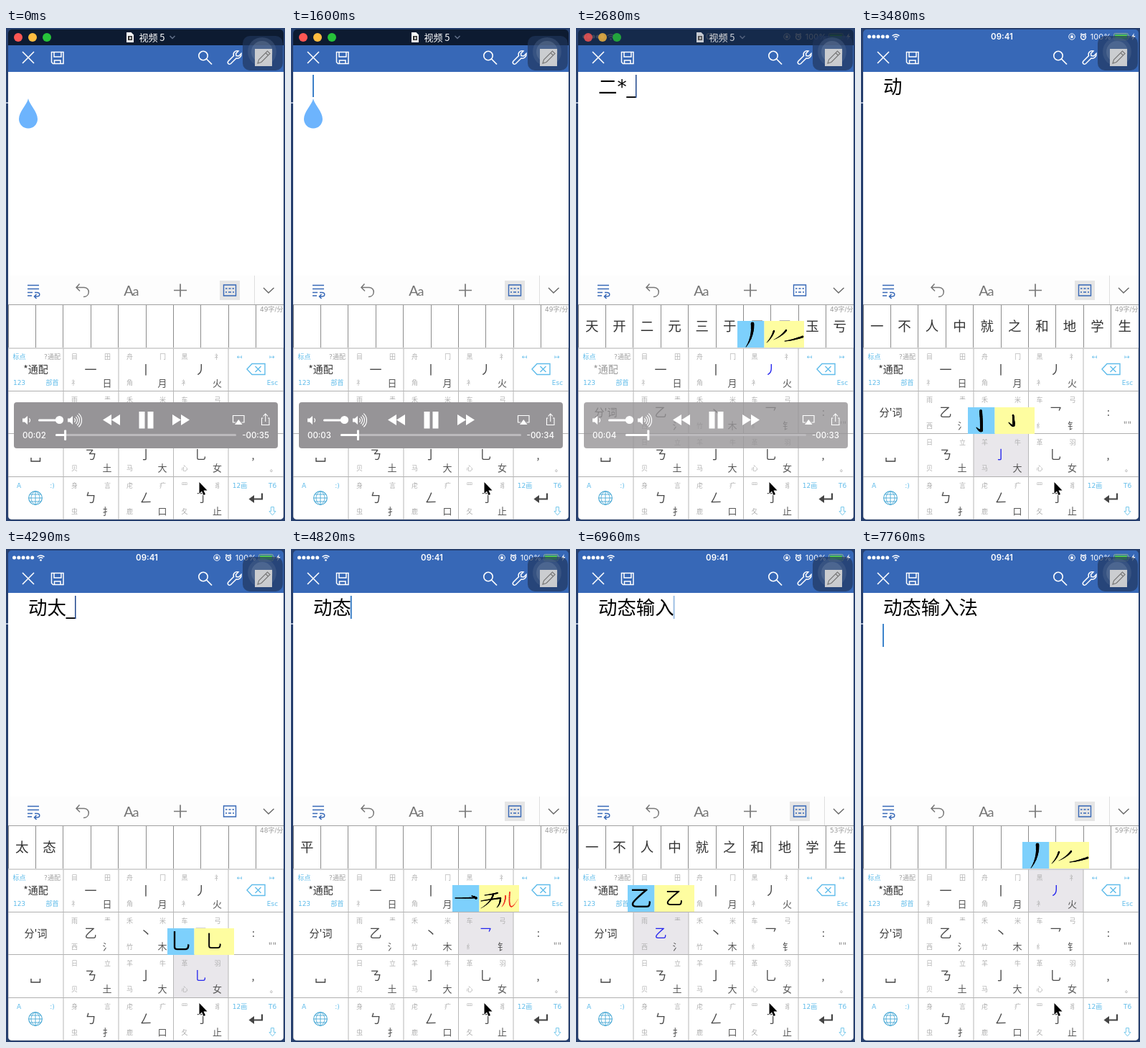
Write an HTML page with a canvas that moves like this. It is 389 px wide and 685 px high and loops after 8 s.

```html
<!DOCTYPE html>
<html lang="zh">
<head>
<meta charset="utf-8">
<style>
html, body { margin: 0; width: 100%; height: 100%; overflow: hidden; background: #27406f; }
canvas { display: block; width: 389px; height: 685px; }
</style>
</head>
<body>
<canvas id="stage"></canvas>
<script>
const W = 389, H = 685, LOOP = 8000;
const CJK = '"Noto Sans CJK SC", "Noto Sans CJK", "Noto Sans", sans-serif';
const LATIN = 'Inter, "Liberation Sans", sans-serif';
const UI = '"DejaVu Sans", "Noto Sans CJK SC", "Noto Sans CJK", sans-serif';
const canvas = document.getElementById('stage');
const dpr = window.devicePixelRatio || 1;
canvas.width = W * dpr;
canvas.height = H * dpr;
const c = canvas.getContext('2d');

const COLS = [3, 80, 157, 233.5, 310, 387];
const ROWS = [445, 504.5, 563.5, 623.5, 683];
const CYAN = '#60bcea', INK = '#484848', BLUE = '#3768b7';

// stroke, then the four corner parts: top left, top right, bottom left, bottom right
const KEYS = [
  ['一目田礻日', '丨舟冂角月', '丿黑礻衤火'],
  ['乙雨龶西氵', '丶禾米竹木', '乛车弓纟钅'],
  ['ㄋ日立贝土', '亅羊牛马大', '乚革羽心女'],
  ['ㄅ身言虫扌', 'ㄥ虍疒鹿口', '㇆罒豸夂止']
];

const COMMON = '一不人中就之和地学生', AFTER = '出家心者气给部光水入';
// time, committed text, composing text, candidates, pressed stroke, caret opacity, speed
const STEPS = [
  [0, '', '', '', '', 0, 49],
  [270, '', '', '', '', .5, 49],
  [540, '', '', '', '', 1, 49],
  [810, '', '', '', '', .5, 49],
  [1070, '', '', '', '', 0, 49],
  [1340, '', '', '', '', .5, 49],
  [1600, '', '', '', '', 1, 49],
  [1870, '', '', '', '一', 1, 49],
  [2140, '', '一', '一不下天开二元无王七', '一', 1, 49],
  [2410, '', '二', '二三天开元于干王玉亏', '*', 1, 49],
  [2680, '', '二*', '天开二元三于干王玉亏', '丿', 1, 49],
  [2950, '', '二*丿', '动元开云无夫', '', 1, 49],
  [3220, '动', '', COMMON, '', 1, 49],
  [3480, '动', '', COMMON, '亅', 0, 49],
  [3750, '动', '大', '大太天夫奇态奋夺头夸', '', 1, 48],
  [4020, '动', '大', '大太天夫奇态奋夺头夸', '丶', 1, 48],
  [4290, '动', '太', '太态', '乚', 1, 48],
  [4560, '动态', '', '平', '', 1, 48],
  [4820, '动态', '', '平', '乛', 1, 48],
  [5090, '动态', '车', '车轻转输软较轮辆轴辑', '', 1, 47],
  [5360, '动态', '车', '车轻转输软较轮辆轴辑', '丿', 1, 47],
  [5620, '动态输', '', AFTER, '', 1, 46],
  [5890, '动态输', '', AFTER, '', .8, 46],
  [6150, '动态输', '', AFTER, '丿', 0, 46],
  [6420, '动态输', '丿', '人入八个从全今分公会', '丶', 1, 50],
  [6690, '动态输入', '', COMMON, '', 1, 53],
  [6960, '动态输入', '', COMMON, '乙', .5, 53],
  [7230, '动态输入', '氵', '法没江河海活水清流汉', 'ㄋ', 1, 56],
  [7490, '动态输入法', '', '', '', .5, 59],
  [7760, '动态输入法', '', '', '丿', 1, 59]
];

// brush strokes: start, bend, end, first and last half width, colour
const POPS = {
  '丿': [[21, 4, 22, 22, 12, 36, 2.4, .5], [51, 14, 48, 23, 41, 30, 1.2, .4],
    [68, 13, 63, 20, 51, 26, 1.2, .4], [66, 28, 76, 27, 91, 22, .5, 1.4]],
  '亅': [[18, 5, 19, 18, 19, 31, 1.9, 1.9], [19, 32, 17, 34, 12, 28, 2, .5],
    [63, 11, 64, 18, 64, 24, 1.2, 1.5], [64, 25, 62, 27, 57, 21, 1.5, .5]],
  '乛': [[4, 18, 18, 18, 33, 17.500, .7, 1], [27, 15, 32, 17, 33, 18, .6, 1.6],
    [45, 14, 54, 13, 63, 11, .5, 1], [40, 22, 52, 20, 67, 18, .6, 1.1],
    [57, 13, 54, 24, 40, 32, 1.2, .4], [67, 18, 67, 26, 62, 31, 1.2, .4],
    [74, 15, 74, 24, 69, 30, 1, .4, '#e32'], [80, 10, 77, 44, 91, 20, 1.1, .4, '#e32']]
};

function text(s, x, y, size, color, align = 'center', family = CJK, weight = 400) {
  c.font = `${weight} ${size}px ${family}`;
  c.textAlign = align;
  c.fillStyle = color;
  c.fillText(s, x, y + size * .37);
}
function rect(x, y, w, h, color) { c.fillStyle = color; c.fillRect(x, y, w, h); }
function round(x, y, w, h, r, color) {
  c.beginPath(); c.roundRect(x, y, w, h, r); c.fillStyle = color; c.fill();
}
function disc(x, y, r, color) {
  c.beginPath(); c.arc(x, y, r, 0, 7); c.fillStyle = color; c.fill();
}
function ring(x, y, r, color, w = 1, from = 0, to = Math.PI * 2) {
  c.beginPath(); c.arc(x, y, r, from, to); c.strokeStyle = color; c.lineWidth = w; c.stroke();
}
// paths are given as SVG data placed at x, y
function line(d, color, w = 1.5, x = 0, y = 0) {
  c.save(); c.translate(x, y); c.strokeStyle = color; c.lineWidth = w;
  c.stroke(new Path2D(d)); c.restore();
}
function shape(d, color, x = 0, y = 0) {
  c.save(); c.translate(x, y); c.fillStyle = color; c.fill(new Path2D(d)); c.restore();
}
function brush(x, y, [ax, ay, bx, by, ex, ey, w0, w1, color = '#000']) {
  for (let i = 0; i <= 40; i++) {
    const k = i / 40, m = 1 - k;
    disc(x + m * m * ax + 2 * m * k * bx + k * k * ex,
      y + m * m * ay + 2 * m * k * by + k * k * ey, w0 + (w1 - w0) * k, color);
  }
}

function statusBar() {
  for (let i = 0; i < 5; i++) disc(11.5 + i * 6.3, 12, 2.5, '#fff');
  disc(48.5, 15.5, 1.3, '#fff');
  for (const r of [3.8, 6.6]) ring(48.5, 15.5, r, '#fff', 1.5, -2.4, -.74);
  text('09:41', 196.5, 12, 11.5, '#fff', 'center', LATIN, 600);
  ring(294, 12, 4.2, '#fff');
  rect(292.3, 11, 3.4, 3, '#fff');
  ring(294, 11, 1.2, '#fff', .8, Math.PI, 0);
  ring(310, 12.5, 3.4, '#fff', 1.5);
  line('M310 10.5V12.5H312M306 9L308 7.5M314 9L312 7.5', '#fff', 1.2);
  text('100%', 349, 12, 11, '#fff', 'right', LATIN);
  c.beginPath(); c.roundRect(352.5, 7.5, 20, 9, 2); c.strokeStyle = '#8fb08f'; c.lineWidth = 1; c.stroke();
  rect(354, 9, 17, 6, '#52c552');
  rect(373.5, 10.5, 1.5, 3, '#8fb08f');
  shape('M381 7L376.500 13H379L378 17L382.500 11H380Z', '#fff');
}

function titleBar() {
  rect(3, 2, 384, 22, '#0d1b31');
  disc(17, 13, 6, '#fc5753');
  disc(37, 13, 6, '#fdbc40');
  disc(57, 13, 6, '#27c33a');
  shape('M168 6H174.500L178 9.500V20H168Z', '#f4f4f4');
  rect(170, 11, 6, 6, '#333');
  rect(172, 12.500, 2.500, 3, '#ddd');
  text('视频 5', 203.500, 13, 13, '#fff');
  line('M228.500 11L232 14.500L235.500 11', '#63708a');
}

function header() {
  rect(3, 2, 384, 59, BLUE);
  statusBar();
  line('M23 33L39 49M39 33L23 49', '#fff', 1.6);
  line('M63.500 33.500H80V49.500H65.500L63.500 47.500ZM67 33.500V40H77V33.500M67.500 49.500V45H76V49.500', '#fff', 1.5);
  ring(275, 38.5, 6.2, '#fff', 1.6);
  line('M279.500 43L287 50.500', '#fff', 1.7);
  line('M310 46L317.500 38.500C316 34 319.500 31 324 32L320.500 35.500L321 38.500L324.500 39L328 35.500C328.500 40 325 43 321 42L313.500 49.500C310.500 51.500 308 48.500 310 46Z', '#fff', 1.5);
}

function touchButton() {
  round(330, 11, 56, 48, 10, 'rgba(31,53,92,.68)');
  disc(357, 33, 20, 'rgba(82,106,146,.38)');
  disc(357, 33, 15, 'rgba(126,145,174,.3)');
  rect(347, 29, 24, 24, 'rgba(214,214,214,.92)');
  line('M351 49L352.500 44L364.500 32L368 35.500L356 47.500ZM362 34.500L365.500 38', '#777', 1.2);
}

function toolbar(composing) {
  rect(3, 344, 384, 41, '#fdfdfd');
  line('M30 357.500H46M30 362.500H46M30 367.500H37M30 372H36M40 367.500H43C48 367.500 48 373 43 373H40M42.500 370L39.500 373L42.500 376', BLUE, 1.5);
  line('M102.500 355.500L98 360.500L103 365.500M98 360.500H109C118 361 117 373.500 108 373.500', '#777', 1.5);
  text('A', 171, 364.5, 20, '#737373', 'center', 'Lato, sans-serif');
  text('a', 181, 365, 18, '#737373', 'center', 'Lato, sans-serif');
  line('M234 364.500H252M243 355.500V373.500', '#777', 1.7);
  if (!composing) {
    rect(298, 351, 28, 27, '#e5e5e5');
    rect(346, 344, 1, 40, '#dedede');
  }
  line('M303.500 357H320.500V372H303.500Z', BLUE, 1.4);
  line('M306 362H308.500M310.500 362H313.500M315.500 362H318M306 367H308M310 367H314M316 367H318', BLUE, 1.5);
  line('M359 361L366 368L373.500 361', '#666', 1.4);
}

function sideKeys(wild) {
  const tag = (s, x, y, color = CYAN) => text(s, x, y, 9, color, 'center', UI);
  tag('标点', 18.5, 457);
  tag('?通配', 64.5, 457, '#a0a0a0');
  text('*通配', 41.5, 474, 14, wild ? '#999' : '#333');
  tag('123', 18.5, 492.5);
  tag('部首', 64.5, 492.5);
  text("分'词", 41.5, 534, 14, '#333');
  line('M35 597V602H47.500V597', '#444', 1.4);
  tag('A', 18, 636);
  tag(':)', 64.5, 636);
  ring(41, 653, 9.3, '#49a9d5', 1.2);
  line('M41 643.500V662.500M31.500 653H50.500M33.500 648H48.500M33.500 658H48.500M41 643.500C33 648 33 658 41 662.500M41 643.500C49 648 49 658 41 662.500', '#49a9d5', .9);
  tag('↤', 325.5, 457);
  tag('↦', 371, 457);
  line('M336 474L343 466.500H361V481.500H343ZM347.500 470L355.500 478M355.500 470L347.500 478', CYAN, 1.4);
  tag('Esc', 371.5, 492.5);
  text(':', 345, 534, 14, '#444');
  text('""', 371.5, 552, 12, '#888');
  text(',', 344.5, 594, 14, '#444');
  text('。', 373, 612, 10, '#888');
  tag('12画', 326, 636);
  tag('T6', 371.5, 636);
  line('M357 646.500V654.500H344', '#444', 2.2);
  shape('M338.500 654.500L346 649V660Z', '#444');
  line('M369.500 665.500H373.500V671.500H376L371.500 677L367 671.500H369.500Z', '#7bcaec', 1);
}

function keyboard(s) {
  const [, , comp, cands, key, , speed] = s;
  rect(3, 385, 384, 298, '#fff');
  KEYS.forEach((row, r) => row.forEach((k, i) => {
    const x = COLS[i + 1], y = ROWS[r], [main, tl, tr, bl, br] = [...k];
    const hit = main === key;
    if (hit && !comp.includes('*')) rect(x, y, COLS[i + 2] - x, ROWS[r + 1] - y, '#e9e7eb');
    text(main, x + 38, y + 29.500, 17, hit ? '#2525ee' : INK, 'center', CJK, 300);
    text(tl, x + 15.5, y + 12, 9, '#b0b0b0');
    text(tr, x + 61.5, y + 12, 9, '#b0b0b0');
    text(bl, x + 15.5, y + 48, 9, '#b0b0b0');
    text(br, x + 61, y + 48, 13, '#555', 'center', CJK, 300);
  }));
  if (key === '*') rect(3, 445, 77, 59, '#e9e7eb');
  sideKeys(comp.includes('*'));
  for (const y of ROWS) rect(3, y - .5, 384, 1, '#b0b0b0');
  for (const x of COLS) rect(x - .5, 445, 1, 238, '#b8b8b8');
  rect(3, 384, 384, 1, '#a0a0a0');
  for (let i = 0; i <= 10; i++) rect(Math.round(2.6 + i * 38.4), 385, 1, 59, '#8c8c8c');
  [...cands].forEach((g, i) => text(g, 22.2 + i * 38.4, 414.5, 18.5, '#333'));
  rect(351, 386, 35, 10, '#fff');
  text(speed + '字/分', 386.5, 391, 9, '#999', 'right', UI);
}

function popup(key) {
  KEYS.forEach((row, r) => row.forEach((k, i) => {
    if (!key || k[0] !== key) return;
    const x = Math.round(COLS[i + 1] - 8.3), y = 407 + r * 60;
    rect(x, y, 37.5, 37, '#7dd0fc');
    rect(x + 37.5, y, 55.5, 37, '#fefda0');
    if (POPS[key]) POPS[key].forEach(b => brush(x, y, b));
    else {
      text(key, x + 18.5, y + 18, 31, '#000');
      text(key, x + 65, y + 18, 25, '#000');
    }
  }));
}

function page(s) {
  const [t, done, comp, , , caret] = s, size = 26.4;
  rect(3, 61, 384, 284, '#fff');
  let x = 31;
  for (const g of done + (comp && comp + '_')) {
    const ascii = g < '\u0080', w = ascii ? size / 2 : size;
    text(g, x + w / 2, 81.5, size, '#000', 'center', ascii ? UI : CJK);
    x += w;
  }
  if (t < 1870) shape('M31 98C33 107 44 116 44 126.500A13 13 0 0 1 18 126.500C18 116 29 107 31 98Z', '#6db4fd');
  c.globalAlpha = caret;
  if (comp) rect(Math.round(x) - 1, 65, 1.5, 32, '#1f468c');
  else if (t >= 7490) rect(30, 104, 2, 32, '#3d84cb');
  else rect(x - 1, 65, 2, done ? 32 : 31, '#3d80c8');
  c.globalAlpha = 1;
}

function speaker(x, waves) {
  shape('M0 -2.500H3L7 -6V6L3 2.500H0Z', '#fff', x, 545);
  for (let i = 0; i < waves; i++) ring(x + 7, 545, 3.5 + i * 3, '#fff', 1.2, -.85, .85);
}

function player(t, opacity) {
  const pos = 2 + t / 1000, sec = Math.floor(pos);
  const clock = n => '00:' + String(n).padStart(2, '0');
  c.globalAlpha = opacity;
  round(11, 520, 368, 64, 4, '#969497');
  c.globalAlpha = 1;
  speaker(23, 1);
  round(45, 543.5, 30, 3, 1.5, '#fff');
  disc(74.5, 544.5, 5.6, '#fff');
  speaker(86, 4);
  shape('M147 537V552L135 544.500ZM159 537V552L147 544.500Z', '#fff');
  rect(185.5, 533, 8, 23.5, '#fff');
  rect(197.5, 533, 8, 23.5, '#fff');
  shape('M232 537V552L244 544.500ZM244 537V552L256 544.500Z', '#fff');
  line('M320 548H316.500V538.500H332V548H328.500', '#fff', 1.2);
  shape('M324.250 544L329.500 551H319Z', '#fff');
  line('M358.500 542H356.500V551.500H367V542H365M361.750 547V536.500M358.500 539.500L361.750 536L365 539.500', '#fff', 1.1);
  text(clock(sec), 23, 566, 11.5, '#fff', 'left', LATIN, 500);
  text('-' + clock(37 - sec), 367, 566, 11.5, '#fff', 'right', LATIN, 500);
  const x = 69 + pos * 6.8;
  round(69, 564, 252, 3, 1.5, '#bcbabd');
  round(69, 564, x - 69, 3, 1.5, '#fff');
  round(x - 1.5, 558.5, 3, 14.5, 1, '#fff');
}

function draw(now) {
  const t = now % LOOP, s = STEPS.findLast(k => k[0] <= t), at = s[0];
  const framed = at < 2950, opacity = at < 2680 ? 1 : .8;
  c.setTransform(dpr, 0, 0, dpr, 0, 0);
  rect(0, 0, W, H, '#27406f');
  rect(0, 103, 3, 2, '#aab6ce');
  c.save();
  c.beginPath(); c.roundRect(3, 2, 384, 681, 5); c.clip();
  header();
  if (framed) {
    c.globalAlpha = opacity;
    titleBar();
    c.globalAlpha = 1;
  }
  touchButton();
  page(s);
  toolbar(s[2]);
  keyboard(s);
  popup(s[4]);
  if (framed) player(at, opacity);
  const arrow = 'M269.500 631V647L273 643.500L275.500 649L278 648L275.500 642.500H280.500Z';
  line(arrow, '#fff', 1.6);
  shape(arrow, '#000');
  c.restore();
}

const start = performance.now();
function tick(now) {
  draw(Math.max(0, now - start));
  requestAnimationFrame(tick);
}
draw(0);
requestAnimationFrame(tick);
</script>
</body>
</html>
```
